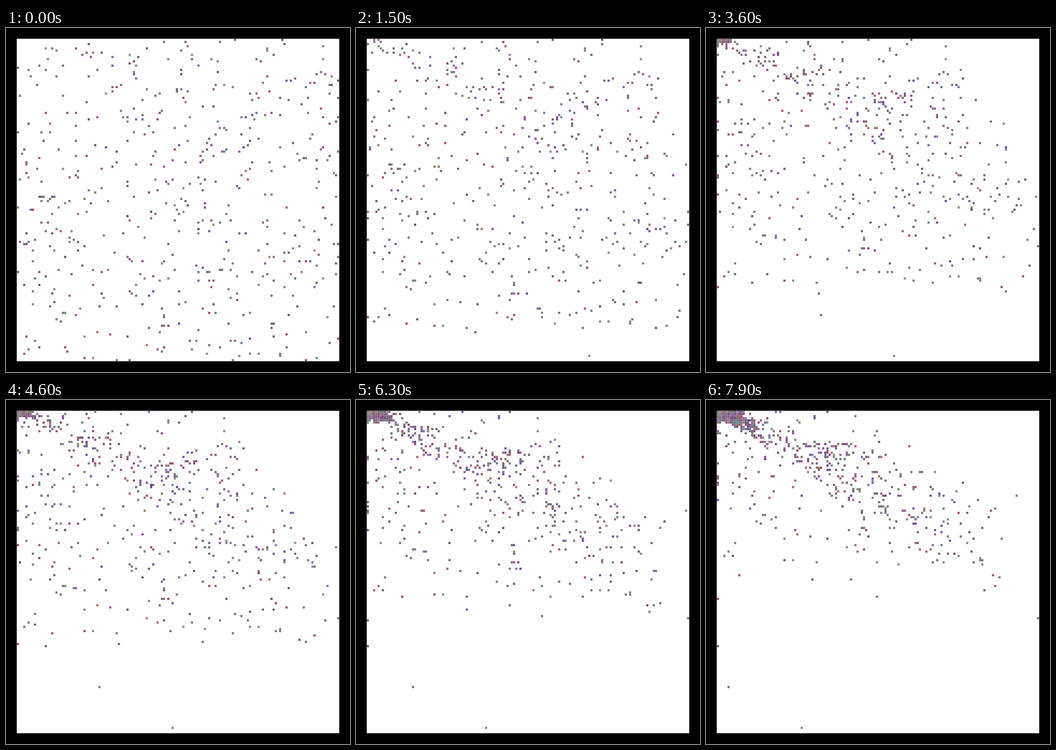
An HTML page with a canvas for the animation above (8 s loop, 600 px wide and 600 px high).

```html
<!DOCTYPE html>
<html lang="en">
<head>
<meta charset="utf-8">
<title>Drifting cells</title>
<style>
html, body { margin: 0; width: 100%; height: 100%; overflow: hidden; background: #000; }
canvas { display: block; }
</style>
</head>
<body>
<canvas id="stage" width="600" height="600"></canvas>
<script>
const ctx = document.getElementById('stage').getContext('2d');
const SIZE = 150, CELL = 3.75, EDGE = 18.75;
const COUNT = 530, STEPS = 80, STEP_MS = 100;

// Lone cells that climb, pause, then run sideways.
const runners = [
  { x: 103, y: 147, climb: 0, pause: 15, dir: -1 },
  { x: 67, y: 145, climb: 17, pause: 0, dir: -1 },
  { x: 23, y: 145, climb: 36, pause: 0, dir: -1 },
  { x: 131, y: 96, climb: 0, pause: 0, dir: 1 }
];

let seed = 7321;
function rand() {
  seed = (seed + 0x6D2B79F5) | 0;
  let t = Math.imul(seed ^ seed >>> 15, 1 | seed);
  t = t + Math.imul(t ^ t >>> 7, 61 | t) ^ t;
  return ((t ^ t >>> 14) >>> 0) / 4294967296;
}
const range = (low, high) => low + (high - low) * rand();

function color() {
  return `rgb(${range(98, 160) | 0},${range(72, 138) | 0},${range(98, 160) | 0})`;
}

const taken = new Set(), cells = [];
const key = (x, y) => y * SIZE + x;

function add(cell) {
  const k = key(cell.x, cell.y);
  if (taken.has(k)) return;
  taken.add(k);
  cells.push({ ...cell, color: color() });
}

runners.forEach(add);
while (cells.length < COUNT) {
  add({
    x: rand() * SIZE | 0,
    y: rand() * SIZE | 0,
    slope: range(0.28, 0.68),
    drift: 0.35 * rand() ** 8
  });
}

// Cells under their own slanted line climb, those above it go left;
// a few often swap the two.
function heading(c, step) {
  if (c.dir) {
    if (step < c.climb) return [0, -1];
    return step < c.climb + c.pause ? [0, 0] : [c.dir, 0];
  }
  const below = c.y > c.slope * c.x + range(-3, 3);
  const swap = rand() < c.drift;
  return below !== swap ? [0, -1] : [-1, 0];
}

function advance(step) {
  for (const c of cells) {
    const [dx, dy] = heading(c, step), x = c.x + dx, y = c.y + dy;
    if (x < 0 || x >= SIZE || y < 0 || taken.has(key(x, y))) continue;
    taken.delete(key(c.x, c.y));
    taken.add(key(x, y));
    c.x = x;
    c.y = y;
  }
}

const history = [];
for (let step = 0; step < STEPS; step++) {
  history.push(cells.map(c => [c.x, c.y]));
  advance(step);
}

function draw(step) {
  ctx.fillStyle = '#000';
  ctx.fillRect(0, 0, 600, 600);
  ctx.fillStyle = '#fff';
  ctx.fillRect(EDGE, EDGE, SIZE * CELL, SIZE * CELL);
  history[step].forEach(([x, y], i) => {
    ctx.fillStyle = cells[i].color;
    ctx.fillRect(EDGE + x * CELL, EDGE + y * CELL, CELL, CELL);
  });
}

const start = performance.now();
let shown = -1;
function tick() {
  const step = Math.floor((performance.now() - start) / STEP_MS) % STEPS;
  if (step !== shown) draw(shown = step);
  requestAnimationFrame(tick);
}
tick();
</script>
</body>
</html>
```
